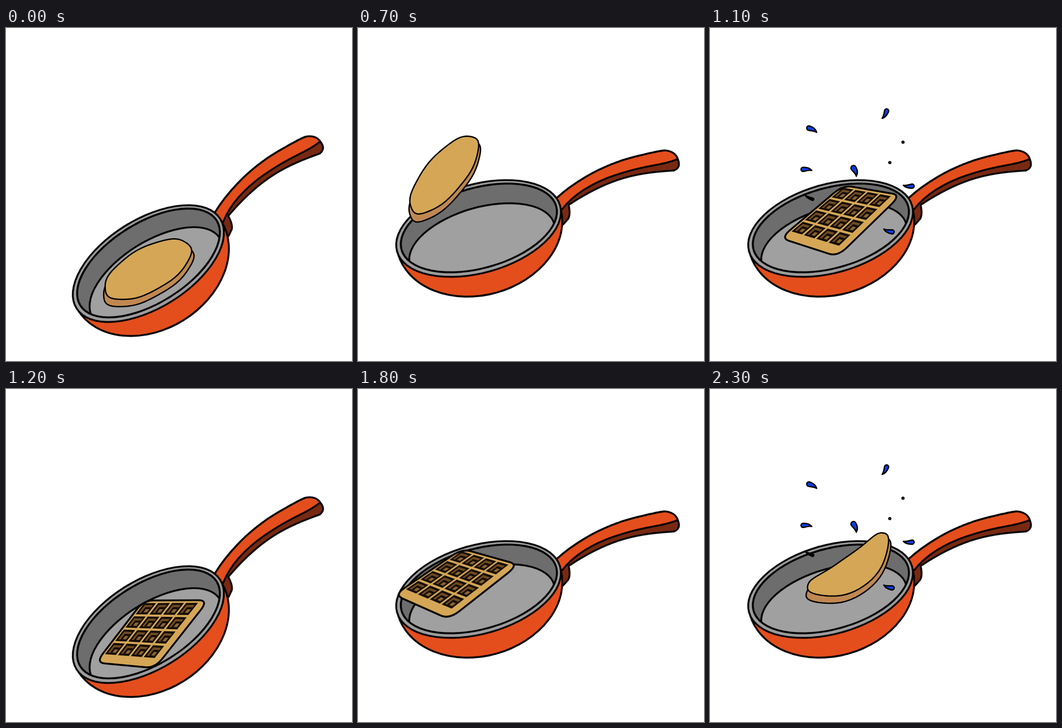
An HTML page that plays this animation: 762 by 735 pixels, repeating every 2.4 s.

```html
<!DOCTYPE html>
<html lang="en">
<head>
<meta charset="utf-8">
<title>Flipping a waffle</title>
<style>
html, body { margin: 0; width: 100%; height: 100%; overflow: hidden; background: #fff; }
svg { display: block; width: 100vw; height: 100vh; }
path, ellipse { stroke: #000; stroke-width: 4; stroke-linejoin: round; stroke-linecap: round; }
.thin path { stroke-width: 3; }
.cells path { stroke: none; }

/* Food: one cel per pose, shown at --t for 100 or 500 ms */
.cel, .hold {
  visibility: hidden;
  animation: cel 2400ms step-end infinite;
  animation-delay: calc(var(--t) * 1ms - 2400ms);
}
.hold { animation-name: hold; }
@keyframes cel { 0% { visibility: visible; } 4.1666%, 100% { visibility: hidden; } }
@keyframes hold { 0% { visibility: visible; } 20.8333%, 100% { visibility: hidden; } }

/* The pan swings through three poses, twice per loop */
.pan { animation: swing 1200ms step-end infinite; }
@keyframes swing {
  0% { transform: translate(313.5px, 520px) rotate(-32deg); }
  41.6666% { transform: translate(270px, 464px) rotate(-18.7deg); }
  50%, 100% { transform: translate(265.5px, 442.5px) rotate(-15.8deg); }
}
</style>
</head>
<body>
<svg id="stage" viewBox="0 0 762 735">
  <defs><clipPath id="well"><ellipse cx="1" cy="-1" rx="177" ry="88.6"/></clipPath></defs>
  <!-- Pan drawn flat around the middle of its rim -->
  <g class="pan">
    <path fill="#782911" d="M184,-18C220,-36 285,-59 365,-59C400,-58 430,-57 442,-54Q463,-46 464,-27
      Q466,-8 449,-6C410,-14 380,-20 340,-20C300,-20 255,-12 205,4Q204,25 196,33L182,42"/>
    <path fill="#e44e1d" d="M184,-18C220,-36 285,-59 365,-59C400,-58 430,-57 442,-54Q463,-46 464,-28
      C430,-24 400,-32 357,-32C300,-33 235,-25 189,9"/>
    <path fill="#e44e1d" d="M-186,5A186,142 0 0 0 186,5"/>
    <ellipse rx="186.5" ry="97.7" fill="#9d9d9d"/>
    <ellipse cx="1" cy="-1" rx="177" ry="88.6" fill="#6d6d6d"/>
    <g clip-path="url(#well)"><ellipse cx="-2" cy="35" rx="165" ry="81" fill="#a0a0a0"/></g>
    <ellipse cx="1" cy="-1" rx="177" ry="88.6" fill="none"/>
  </g>
  <g id="food"></g>
</svg>
<script>
const GOLD = '#d4a656', CRUST = '#c08850', BLUE = '#0a3fe6', DARK = '#120c06';

const path = (d, fill) => `<path d="${d}" fill="${fill}"/>`;
const poly = pts => 'M' + pts.map(p => p.map(n => n.toFixed(1))).join('L') + 'Z';
const lerp = (a, b, t) => a.map((v, i) => v + (b[i] - v) * t);

// Slightly rippled ellipse, turned by degrees and bent like a bean
function slab(cx, cy, turn, rx, ry, bend) {
  const a = turn * Math.PI / 180, c = Math.cos(a), s = Math.sin(a), pts = [];
  for (let i = 0; i < 60; i++) {
    const th = i * Math.PI / 30, r = 1 + .012 * Math.sin(7 * th);
    const u = r * Math.cos(th), x = rx * u;
    const y = ry * r * Math.sin(th) + bend * (.45 - u * u);
    pts.push([cx + x * c - y * s, cy + x * s + y * c]);
  }
  return poly(pts);
}

// Pancake: a wider crust showing below the golden top
const cake = (x, y, turn, ry = 48, bend = 0) => '<g class="thin">' +
  path(slab(x + 1, y + 14, turn, 111, ry, bend), CRUST) +
  path(slab(x, y, turn, 106, ry, bend), GOLD) + '</g>';

// Waffle inside the quad a b c d; "wide" is the share its cells reach across
function waffle(quad, wide = .87) {
  const [a, b, c, d] = quad;
  const at = (u, v) => lerp(lerp(a, b, u), lerp(d, c, u), v);
  const edge = quad.map((p, i) => {
    const from = lerp(p, quad[(i + 3) % 4], .15), to = lerp(p, quad[(i + 1) % 4], .15);
    return `${i ? 'L' : 'M'}${from}Q${p} ${to}`;
  }).join('') + 'Z';
  const layers = [[0, 1, DARK], [.17, .86, '#6f4a20'], [.36, .86, DARK], [.53, .82, '#8a632e']];
  let cells = '';
  for (let row = 0; row < 4; row++)
    for (let col = 0; col < 4; col++)
      for (const [lo, hi, fill] of layers) {
        const spot = (x, y) => at(.04 + (wide - .04) * (col * .26 + x * .22),
                                  .04 + .82 * (row * .26 + y * .22));
        cells += path(poly([spot(lo, lo), spot(hi, lo), spot(hi, hi), spot(lo, hi)]), fill);
      }
  return path(edge, GOLD) + `<g class="cells">${cells}</g>`;
}

const waffleRest = waffle([[303, 467], [446, 466], [328, 616], [198, 604]]);
const waffleTilt = waffle([[300, 412], [418, 464], [250, 562], [138, 492]]);
const waffleTurn = waffle([[194, 163], [302, 74], [309, 267], [196, 345]]);
const waffleRise = waffle([[224, 32], [146, 153], [198, 348], [270, 213]], .72);

// Move a shape's centre cx,cy to x,y and turn it
const move = (body, cx, cy, x, y, turn) =>
  `<g transform="translate(${x} ${y}) rotate(${turn}) translate(${-cx} ${-cy})">${body}</g>`;

// Drop with its round head at x,y and its tail turned by degrees
const drop = (x, y, turn, r = 4.5, fill = BLUE) =>
  `<g transform="translate(${x} ${y}) rotate(${turn})">` +
  path(`M19,3C13,${-r} ${r},${-r} 0,${-r}A${r},${r} 0 0 0 0,${r}C${r},${r} 11,1 19,3Z`, fill) + '</g>';
const bead = (x, y) => `<circle cx="${x}" cy="${y}" r="2.3" fill="#777" stroke="#000" stroke-width="2.5"/>`;
const splash = '<g class="thin">' +
  drop(218, 210, 20, 5) + drop(389, 172, 112) + drop(205, 301, -2) + drop(316, 298, 62, 5.5) +
  drop(445, 338, 176) + drop(401, 439, 190) + drop(226, 367, 200, 2.5, '#000') +
  bead(425, 241) + bead(396, 286) + '</g>';

const cel = (t, body, kind = 'cel') => `<g class="${kind}" style="--t:${t}">${body}</g>`;

let cels = cel(0, cake(312.5, 533, -29.4), 'hold') + cel(500, cake(277.5, 486, -20));
for (let i = 0; i < 3; i++)
  cels += cel(600 + i * 100, cake(180 + i * 10, 440 - i * 116, -24 - i * 26, 48 - i * 5));
cels += cel(900, waffleTurn) +
  cel(1000, move(waffleTurn, 250, 210, 262, 294, 25)) +
  cel(1100, move(waffleTilt, 278, 487, 290, 425, -14) + `<g transform="translate(0 11)">${splash}</g>`) +
  cel(1200, waffleRest, 'hold') + cel(1700, waffleTilt);
for (let i = 0; i < 2; i++)
  cels += cel(1800 + i * 100, move(waffleTilt, 278, 487, 218 - i * 20, 430 - i * 115, -8 - i * 27));
cels += cel(2000, waffleRise) + cel(2100, cake(222, 200, -84, 32)) +
  cel(2200, cake(222, 208, -55, 37, 28)) + cel(2300, cake(311, 394, -35, 37, 28) + splash);

document.getElementById('food').innerHTML = cels;
</script>
</body>
</html>
```
